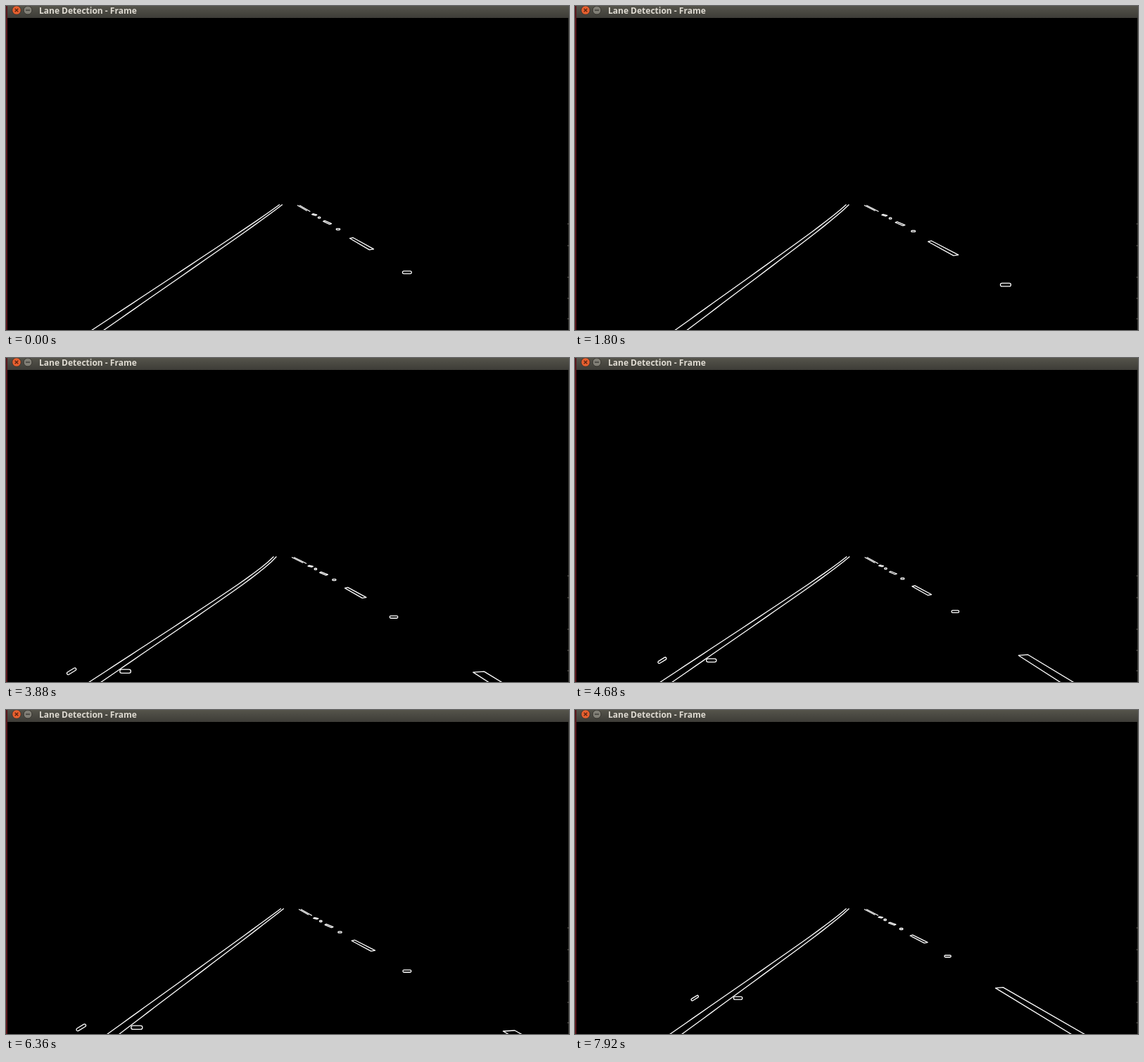
Write an HTML page with a canvas that moves like this. It is 800 by 461 pixels and loops after 8.64 s.

```html
<!DOCTYPE html>
<html lang="en">
<head>
<meta charset="utf-8">
<title>Lane Detection - Frame</title>
<style>
  html, body { margin: 0; width: 100%; height: 100%; overflow: hidden; background: #000; }
  canvas { position: absolute; left: 0; top: 0; }
  .edge { position: absolute; left: 0; top: 0; width: 2px; height: 461px; background: #5a151a; }
  .side { position: absolute; left: 799px; top: 0; width: 1px; height: 461px; background: #3c3b37; }
  .bar { position: absolute; left: 2px; top: 0; width: 798px; height: 17px; background: linear-gradient(#55544b, #3d3c37); }
  .bar span { position: absolute; left: 45px; top: -2px; font: 700 12px/17px "Open Sans", sans-serif; color: #dfdbd2; white-space: pre; }
  .bar svg { position: absolute; left: 0; top: 0; }
</style>
</head>
<body>
<canvas id="view" width="800" height="461"></canvas>
<div class="edge"></div>
<div class="side"></div>
<div class="bar">
  <svg width="42" height="16">
    <circle cx="13" cy="6" r="6.3" fill="#e9602f" stroke="#35332e"/>
    <path d="M10.7 3.7l4.6 4.6m0-4.6l-4.6 4.6" stroke="#5c2512" stroke-width="1.4"/>
    <circle cx="29" cy="6" r="6" fill="#817f76" stroke="#35332e"/>
    <path d="M26 6h6" stroke="#3c3b37" stroke-width="1.4"/>
  </svg>
  <span>Lane Detection - Frame</span>
</div>
<script>
const ctx = document.getElementById('view').getContext('2d');
const LOOP = 8640, LAST = 7920, STEP = 40;
const HORIZON = 272, TOP = 283, BOTTOM = 461;

// Depth is 1 / (y - HORIZON); dashes repeat evenly in it
const PERIOD = 0.0128, DASH = 0.0041, GAP_DOT = 0.00465;

// The drive: time, dash periods passed, sideways drift, bend of the road ahead
const drive = [
  [0, 0, 0, 3],
  [920, 2.17, 29, 3],
  [2640, 5.95, 12, 9],
  [3880, 8.92, -4, 11],
  [5440, 12.68, 2, 0],
  [7240, 17.11, 41, 2],
  [7920, 18.73, 13, 6]
];

function driveAt(t) {
  let i = 0;
  while (i < drive.length - 2 && t >= drive[i + 1][0]) i++;
  const a = drive[i], b = drive[i + 1], k = (t - a[0]) / (b[0] - a[0]);
  return a.map((v, j) => v + (b[j] - v) * k);
}

const depthToY = depth => HORIZON + 1 / depth;

function curve(xAt, from, to) {
  const n = Math.max(1, Math.ceil((to - from) / 8));
  ctx.beginPath();
  for (let i = 0; i <= n; i++) {
    const y = from + (to - from) * i / n;
    ctx.lineTo(xAt(y), y);
  }
  ctx.stroke();
}

function pill(x, y, w, h, tilt = 0) {
  ctx.beginPath();
  ctx.save();
  ctx.translate(x, y);
  ctx.rotate(tilt);
  ctx.roundRect(-w / 2, -h / 2, w, h, h / 2);
  ctx.restore();
  ctx.stroke();
}

function dash(left, right, far, near) {
  ctx.beginPath();
  ctx.moveTo(left(far), far + 1);
  ctx.lineTo(right(far) - 1, far);
  ctx.lineTo(right(near), near - 1);
  ctx.lineTo(left(near) + 1, near);
  ctx.closePath();
  ctx.stroke();
}

function draw(t) {
  const [, passed, drift, bend] = driveAt(t);
  // Straight lane edge that curls left close to the top
  const edge = (top, bottom) => y =>
    top + (bottom - top) * (y - TOP) / (BOTTOM - TOP) - bend * Math.exp((TOP - y) / 20);

  const outer = edge(390, 121 + drift), inner = edge(394, 138 + drift);
  const lane = edge(418, 700 + 1.1 * drift);
  const half = y => Math.max(1.5, 0.048 * (y - HORIZON));
  const left = y => lane(y) - half(y), right = y => lane(y) + half(y);

  ctx.clearRect(0, 0, 800, 461);
  ctx.save();
  ctx.beginPath();
  ctx.rect(0, TOP - 1, 800, BOTTOM);
  ctx.clip();
  ctx.translate(0.5, 0.5);
  ctx.strokeStyle = '#fff';
  ctx.lineWidth = 1.3;
  ctx.lineJoin = 'round';

  curve(outer, TOP - 1, BOTTOM);
  curve(inner, TOP - 1, BOTTOM);

  // distant dashes run together
  curve(left, TOP, 291);
  curve(right, TOP, 292);

  for (let n = Math.floor(passed) - 2; ; n++) {
    const far = (n + 1.37 - passed) * PERIOD;
    if (far > 0.048) break;

    if (far > 0.0052) dash(left, right, depthToY(far), depthToY(Math.max(0.004, far - DASH)));

    const dot = far + GAP_DOT;
    if (dot > 0.005 && dot < 0.041) {
      const y = depthToY(dot), size = 1 / dot;
      pill(lane(y), y, Math.max(3.5, 0.12 * size), Math.max(2, 0.035 * size));
    }

    // markers on both sides of the solid line, at every second dash
    if (n % 2 === 0 && far > 0.0045 && far < 0.012) {
      const depth = 0.0022 + 0.62 * far, y = depthToY(depth), size = 1 / depth;
      pill(inner(y) + 0.07 * size, y, 0.09 * size, 0.03 * size);
      pill(outer(y) - 0.28 * size, y, 0.085 * size, 0.022 * size, -0.55);
    }
  }
  ctx.restore();

  // specks on the window's right edge
  ctx.fillStyle = '#55534f';
  for (const y of [309, 340, 385, 415, 444]) ctx.fillRect(798, y, 1, 2);
}

const start = performance.now();
let shown = -1;
function tick() {
  const t = Math.max(0, performance.now() - start) % LOOP;
  const step = Math.min(LAST, Math.floor(t / STEP) * STEP);
  if (step !== shown) draw(shown = step);
  requestAnimationFrame(tick);
}
tick();
</script>
</body>
</html>
```
